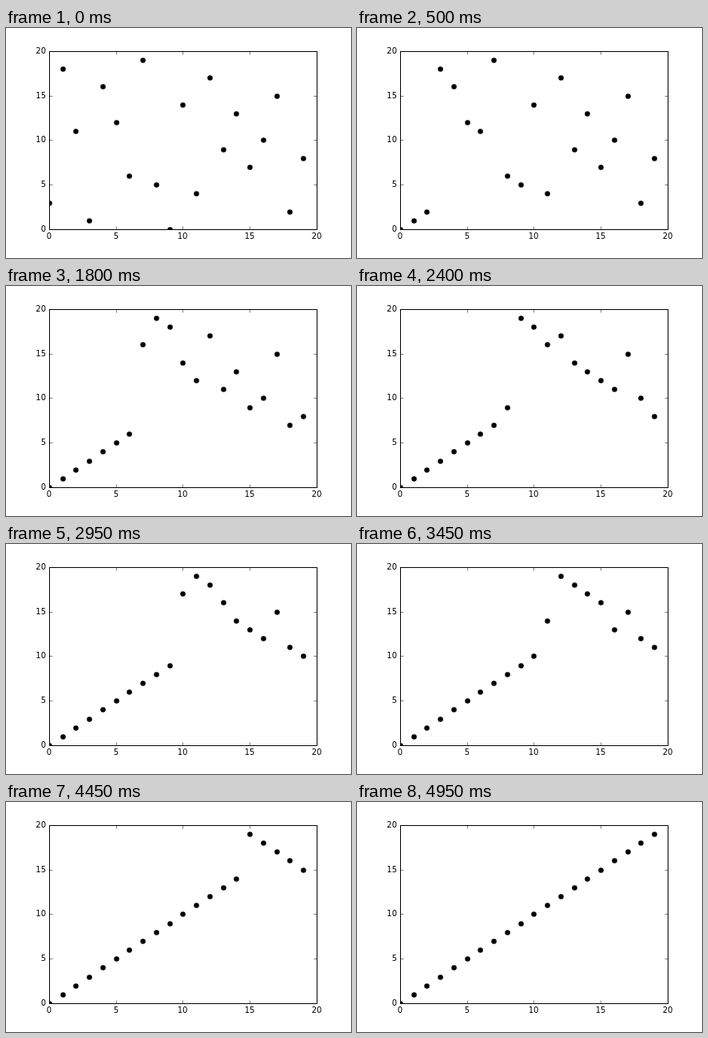
Animation of 432 by 288 pixels, one loop 5 s. Source, as an HTML page with a canvas:

```html
<!DOCTYPE html>
<html lang="en">
<head>
<meta charset="utf-8">
<title>Exchange sort</title>
<style>
  html, body { margin: 0; width: 432px; height: 288px; overflow: hidden; background: #fff; }
  canvas { display: block; }
</style>
</head>
<body>
<canvas id="plot" width="432" height="288"></canvas>
<script>
const ctx = document.getElementById('plot').getContext('2d');
const STEP = 50;
const START = [3, 18, 11, 1, 16, 12, 6, 19, 5, 0, 14, 4, 17, 9, 13, 7, 10, 15, 2, 8];

// Data to pixel centres
const px = x => Math.round(54 + 16.74 * x) + 0.5;
const py = y => Math.round(252 - 11.16 * y) + 0.5;
const LEFT = px(0), RIGHT = px(20), TOP = py(20), BOTTOM = py(0);

// One state per swap of an exchange sort
function sortStates(values) {
  const a = [...values], states = [[...a]];
  for (let i = 0; i < a.length; i++) {
    for (let j = i + 1; j < a.length; j++) {
      if (a[j] < a[i]) {
        [a[i], a[j]] = [a[j], a[i]];
        states.push([...a]);
      }
    }
  }
  return states;
}

function line(x, y, dx, dy) {
  ctx.beginPath();
  ctx.moveTo(x, y);
  ctx.lineTo(x + dx, y + dy);
  ctx.stroke();
}

function drawAxes() {
  ctx.strokeStyle = ctx.fillStyle = '#000';
  ctx.font = '10px "DejaVu Sans", sans-serif';
  ctx.lineWidth = 0.5;
  for (let v = 0; v <= 20; v += 5) {
    const x = px(v), y = py(v);
    line(x, BOTTOM, 0, -4);
    line(x, TOP, 0, 4);
    line(LEFT, y, 4, 0);
    line(RIGHT, y, -4, 0);
    ctx.textAlign = 'center';
    ctx.fillText(v, x - 0.5, 264);
    ctx.textAlign = 'right';
    ctx.fillText(v, 50, Math.floor(252 - 11.16 * v + 3.5));
  }
  ctx.lineWidth = 1;
  ctx.strokeRect(LEFT, TOP, RIGHT - LEFT, BOTTOM - TOP);
}

function drawDots(values) {
  ctx.save();
  ctx.beginPath();
  ctx.rect(LEFT, TOP, RIGHT - LEFT, BOTTOM - TOP);
  ctx.clip();
  ctx.fillStyle = '#000';
  values.forEach((v, i) => {
    ctx.beginPath();
    ctx.arc(px(i), py(v), 3.25, 0, 2 * Math.PI);
    ctx.fill();
  });
  ctx.restore();
}

const states = sortStates(START);
const begin = performance.now();

function render() {
  const elapsed = Math.max(0, performance.now() - begin);
  ctx.fillStyle = '#fff';
  ctx.fillRect(0, 0, 432, 288);
  drawDots(states[Math.floor(elapsed / STEP) % states.length]);
  drawAxes();
  requestAnimationFrame(render);
}
render();
</script>
</body>
</html>
```
